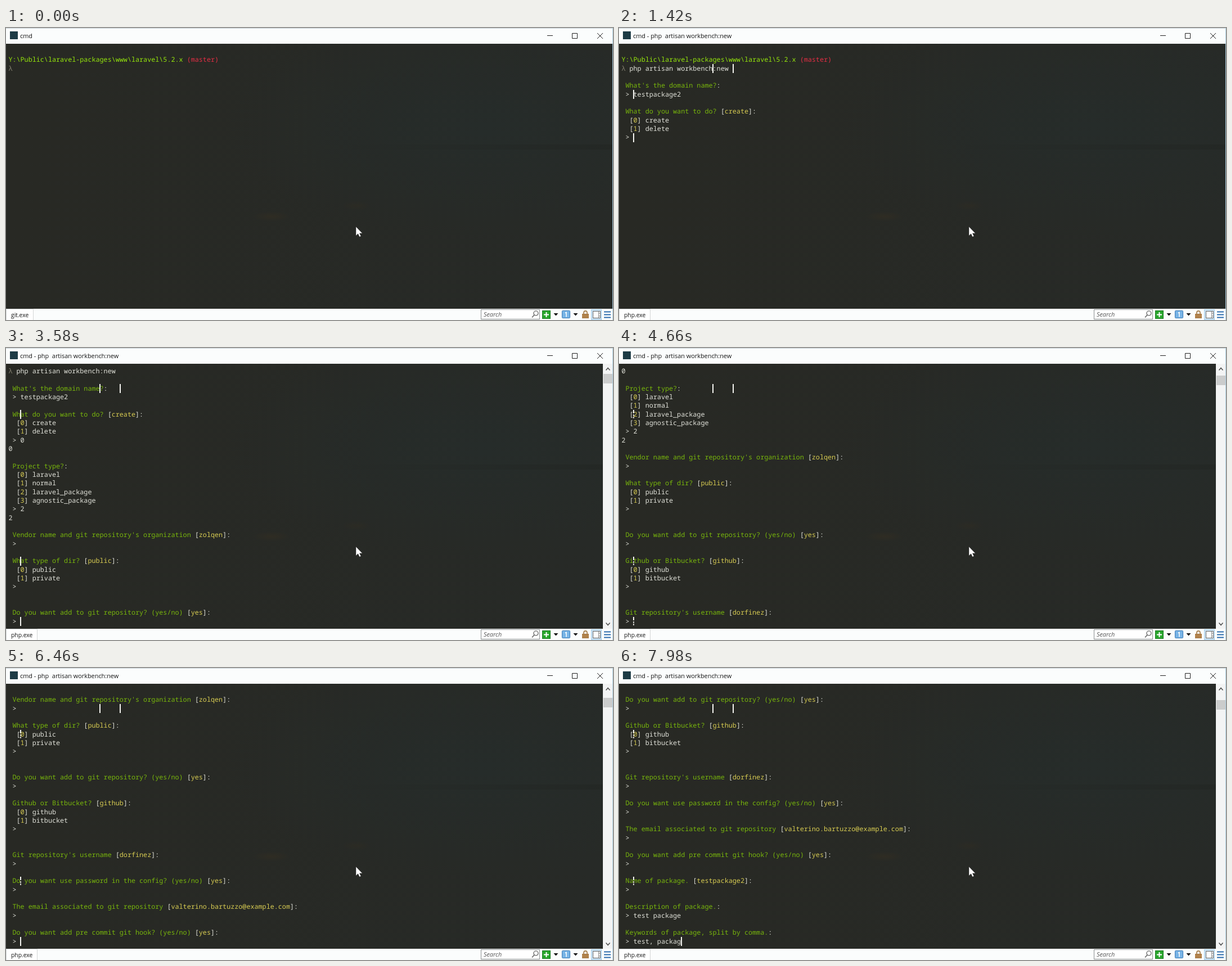
Animation, 1079 px wide and 519 px high, one loop 8000 ms. Source, as an HTML page:

```html
<!DOCTYPE html>
<html lang="en">
<head>
<meta charset="utf-8">
<title>Terminal session</title>
<style>
html, body { margin: 0; width: 100%; height: 100%; overflow: hidden; }
body { position: relative; background: #fbfdfd; }
#stage { position: absolute; left: 0; top: 0; width: 1079px; height: 519px; overflow: hidden; }
#stage > * { position: absolute; }
#term {
  left: 0; top: 28px; width: 1078px; height: 471px;
  background:
    linear-gradient(90deg, transparent 55%, #1f221f66) 0 179px / 100% 9px no-repeat,
    radial-gradient(ellipse 34px 9px at 472px 307px, #3a301f66, transparent),
    radial-gradient(ellipse 26px 8px at 622px 288px, #352d1f55, transparent),
    radial-gradient(ellipse 460px 190px at 850px 150px, #262c2a, transparent),
    linear-gradient(90deg, #282924, #272a27);
}
#text {
  left: 4.4px; top: 34.1px; margin: 0; color: #e0e1d9; white-space: pre;
  font: 11.767px/15.34px "Noto Sans Mono", "DejaVu Sans Mono", monospace;
  text-rendering: geometricPrecision; font-variant-ligatures: none;
}
#text div { height: 15.34px; }
.g { color: #78b60c; } .p { color: #95e60c; } .r { color: #e62e45; }
.y { color: #d8cc52; } .d { color: #827f6f; }
.bar { width: 2px; height: 16px; background: #f4f4f0; }
.bar.dash { background: linear-gradient(#f4f4f0 6px, transparent 6px 8px, #c9c9c4 8px 11px, transparent 11px 12px, #c9c9c4 12px 15px, transparent 15px); }
.bar.off { height: 7px; }
#title, #tab, #search { font: 10.9px/16px "Open Sans", "Noto Sans", sans-serif; color: #151515; white-space: pre; }
#title { left: 25px; top: 6px; }
#tab {
  left: 0; top: 499px; height: 19px; padding: 0 8px 0 8px; line-height: 21px; font-size: 10.3px;
  background: #fff; border: solid #d3d6d6; border-width: 1px 1px 0;
}
#search { left: 849px; top: 501px; font-style: italic; color: #555; }
#scroll { left: 1061px; top: 28px; width: 17px; height: 471px; background: #f3f4f4; }
#scroll svg { position: absolute; left: 1px; top: 0; }
#thumb { position: absolute; left: 1px; width: 16px; height: 17px; background: #cbcccc; }
</style>
</head>
<body>
<div id="stage">
  <div id="term"></div>
  <pre id="text"></pre>
  <div id="bars" style="left:0;top:0"></div>
  <div id="scroll">
    <div id="thumb"></div>
    <svg width="16" height="470" fill="none" stroke="#505050" stroke-width="1.5"><path d="M4.5 11.5l3.5-4 3.5 4M4.5 460.5l3.5 4 3.5-4"/></svg>
  </div>
  <svg width="1079" height="519" style="left:0;top:0" fill="none">
    <path d="M0 .5H1079" stroke="#c9d3d8"/>
    <path d="M1078.5 0V519" stroke="#a9cbdc"/>
    <rect x="7" y="6" width="14" height="14" fill="#1d3b45"/>
    <path d="M962 13.5h10M1006.5 9.5h9v9h-9zM1051 9l10 10M1061 9l-10 10" stroke="#222"/>
    <path d="M622 353v16.3l3.7-3.5 2.6 5.4 2.7-1.3-2.5-5h5z" fill="#fff" stroke="#222" stroke-width=".5"/>
    <rect x="844.5" y="500.5" width="104" height="17" fill="#fff" stroke="#8b8f90"/>
    <g stroke="#555" stroke-width="1.2"><circle cx="942" cy="507" r="4"/><path d="M939 510l-4 4.5"/></g>
    <rect x="953.5" y="502.5" width="14" height="14" fill="#28a52c" stroke="#187a20"/>
    <path d="M960.5 505v9M956 509.5h9" stroke="#fff" stroke-width="2"/>
    <path d="M973.5 507h8l-4 4.5zM1008.5 507h8l-4 4.5z" fill="#111"/>
    <rect x="988.5" y="502.5" width="14" height="13" rx="1" fill="#78b4e6" stroke="#3978b5"/>
    <path d="M994 506.5l2-1v8" stroke="#fff" stroke-width="1.5"/>
    <path d="M1027 509v-3a3 3 0 0 1 6 0v3" stroke="#a98555" stroke-width="1.8"/>
    <rect x="1024" y="508" width="12" height="8" fill="#a5753f"/>
    <path d="M1024 510.5h12M1024 513.5h12" stroke="#c79a62"/>
    <rect x="1040.5" y="500.5" width="18" height="18" fill="#cfe5f5" stroke="#a5cce8"/>
    <rect x="1043.5" y="503.5" width="13" height="12" fill="#fff" stroke="#666"/>
    <path d="M1053.5 504v11M1054 507h2M1054 512h2" stroke="#888"/>
    <path d="M1063 504.5h12M1063 509.5h12M1063 514.5h12" stroke="#2d6cae" stroke-width="2"/>
  </svg>
  <div id="title"></div>
  <div id="tab"></div>
  <div id="search">Search</div>
</div>
<script>
const LOOP = 8000, ROWS = 30, ROW_H = 15.34, COL_W = 7.06, LEFT = 4.4, TOP = 33.1;
const $ = id => document.getElementById(id);

const lines = String.raw`
Y:\Public\laravel-packages\www\laravel\5.2.x (master)
λ php artisan workbench:new${' '}

 What's the domain name?:
 > testpackage2

 What do you want to do? [create]:
  [0] create
  [1] delete
 > 0
0

 Project type?:
  [0] laravel
  [1] normal
  [2] laravel_package
  [3] agnostic_package
 > 2
2

 Vendor name and git repository's organization [zolqen]:
 >${' '}

 What type of dir? [public]:
  [0] public
  [1] private
 >${' '}


 Do you want add to git repository? (yes/no) [yes]:
 >${' '}

 Github or Bitbucket? [github]:
  [0] github
  [1] bitbucket
 >${' '}


 Git repository's username [dorfinez]:
 >${' '}

 Do you want use password in the config? (yes/no) [yes]:
 >${' '}

 The email associated to git repository [valterino.bartuzzo@example.com]:
 >${' '}

 Do you want add pre commit git hook? (yes/no) [yes]:
 >${' '}

 Name of package. [testpackage2]:
 >${' '}

 Description of package.:
 > test package

 Keywords of package, split by comma.:
 > test, packag`.split('\n');

// line: [characters shown at first, typing start, ms per character]
const typing = {
  2: [2, 20, 24], 5: [3, 900, 22], 10: [3, 1510, 20], 18: [3, 2770, .1],
  45: [0, 6100, .1], 55: [3, 7440, 22.5], 58: [3, 7732, 22.5]
};

// [time, lines printed, cursor look]
const steps = [
  [0, 3, ''], [20, 3, 'on'], [650, 3, ''], [780, 6, 'on'], [1175, 11, ''], [1420, 11, 'on'],
  [1600, 12, ''], [1690, 19, 'on'], [2050, 19, ''], [2770, 23, 'on'], [3130, 28, ''], [3220, 28, 'on'],
  [3580, 32, 'on'], [3760, 32, 'off'], [3940, 32, 'on'], [4120, 37, 'on'], [4300, 37, 'off'],
  [4480, 37, 'on'], [4570, 39, ''], [4660, 41, 'dash'], [5110, 44, 'dash'], [5560, 44, 'on'],
  [5650, 45, ''], [5740, 46, 'on'], [6100, 47, 'on'], [6280, 47, 'off'], [6460, 50, 'on'],
  [6640, 50, 'off'], [6910, 53, 'off'], [7270, 56, ''], [7440, 56, 'on'], [7710, 59, 'on']
];

const tabs = [
  [0, 'git'], [20, 'cmd'], [650, 'php'], [1175, 'stty'], [1220, 'php'],
  [1600, 'stty'], [1870, 'php'], [3130, 'stty'], [3400, 'php']
];

// Cursor marks left on the screen: [time, row, column, time it breaks up]
const marks = [[524, 2, 23, LOOP], [650, 2, 28, LOOP], [900, 5, 3, 4480], [3130, 22, 3, 4660]];

const at = (table, t) => table.filter(e => e[0] <= t).pop();
const span = (cls, s) => `<span class="${cls}">${s}</span>`;

function shown(i, t) {
  const rule = typing[i];
  if (!rule) return lines[i];
  const [first, start, step] = rule;
  return lines[i].slice(0, t < start ? first : first + 1 + Math.floor((t - start) / step));
}

function paint(s) {
  if (s[0] === 'Y') return s.replace(/(.*) (\(.*)/, (_, path, branch) => span('p', path) + ' ' + span('r', branch));
  if (s[0] === 'λ') return span('d', 'λ') + s.slice(1);
  const ask = s.match(/^( [A-Z].*?)(?: \[(.+)\])?:$/);
  if (ask) return span('g', ask[1]) + (ask[2] ? ` [${span('y', ask[2])}]` : '') + ':';
  return s.replace('>', '&gt;').replace(/^  \[(\d)\]/, (_, n) => `  [${span('y', n)}]`);
}

const bar = (row, col, look) =>
  `<div class="bar ${look}" style="position:absolute;left:${LEFT + col * COL_W - .4}px;top:${TOP + row * ROW_H}px"></div>`;

const last = {};
function setHtml(id, html) {
  if (last[id] !== html) $(id).innerHTML = last[id] = html;
}

function draw(t) {
  const [, count, look] = at(steps, t);
  const top = Math.max(0, count - ROWS);
  const visible = [];
  for (let i = top; i < count; i++) visible.push(shown(i, t));
  const row = visible.length - 1;

  setHtml('text', visible.map(s => `<div>${paint(s)}</div>`).join(''));
  setHtml('bars',
    marks.filter(m => t >= m[0]).map(([, r, c, broken]) => bar(r, c, t < broken ? '' : 'dash')).join('') +
    (look ? bar(row, visible[row].length, look) : ''));
  setHtml('title', t < 650 ? 'cmd' : 'cmd - php  artisan workbench:new');
  setHtml('tab', at(tabs, t)[1] + '.exe');
  $('scroll').style.display = top && !(t >= 3940 && t < 4120) ? '' : 'none';
  $('thumb').style.top = 17 + top * .4 + 'px';
}

const start = performance.now();
(function tick() {
  draw((performance.now() - start) % LOOP);
  requestAnimationFrame(tick);
})();
</script>
</body>
</html>
```
